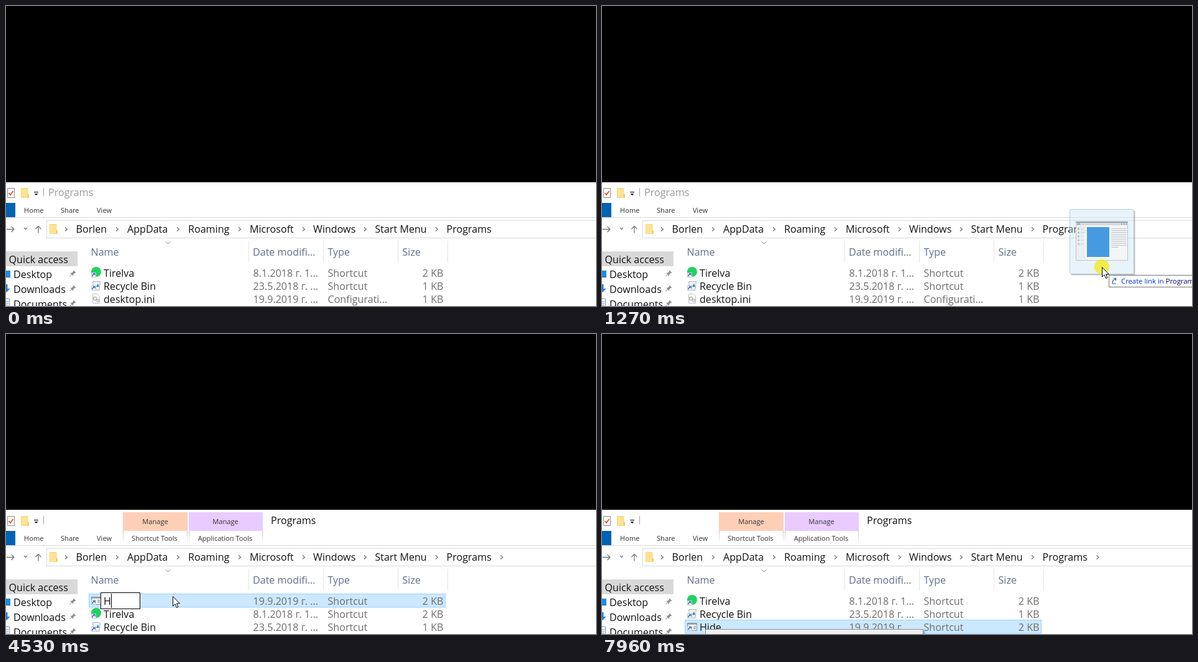
Animation of 949x483 px, one loop 8 s. Source, as an HTML page:

```html
<!DOCTYPE html>
<html lang="en">
<head>
<meta charset="utf-8">
<title>Adding a shortcut to the Start Menu</title>
<style>
html, body { margin: 0; height: 100%; overflow: hidden; background: #000; }
svg { display: block; width: 949px; height: 483px; }
text { font: 16.1px "Open Sans", "Noto Sans", sans-serif; font-variant-ligatures: none; fill: #111; }
.small text, text.small { font-size: 11.1px; fill: #333; }
.mid { text-anchor: middle; }
.end { text-anchor: end; }
.head text { fill: #5f6f8c; }
.cell text { fill: #6d6d6d; }
.line { fill: none; stroke: #777; stroke-width: 1.3; }

/* One loop is 8 s, so 1% is 80 ms. Every change is a hard step. */
.a { animation: 8s step-end -10ms infinite; }
.off { opacity: 0; }

.ptr { animation-name: ptr; }
@keyframes ptr {
  6.25% { opacity: 1; transform: translate(306px, 335px); }
  7.125% { transform: translate(630px, 350px); }
  8% { transform: translate(743px, 357px); }
  9% { transform: translate(769px, 371px); }
  10% { transform: translate(784px, 387px); }
  11% { transform: translate(793px, 399px); }
  12% { transform: translate(798px, 408px); }
  13% { transform: translate(801px, 414px); }
  14% { transform: translate(803px, 418px); }
  15% { transform: translate(804px, 419px); }
  15.875% { transform: translate(804px, 420px); }
  31.25% { transform: translate(780px, 420px); }
  32.25% { transform: translate(690px, 420px); }
  33.25% { transform: translate(565px, 421px); }
  34.25% { transform: translate(430px, 421px); }
  35.25% { transform: translate(330px, 422px); }
  36.25% { transform: translate(284px, 422px); }
  37.25% { transform: translate(268px, 422px); }
  78% { transform: translate(267px, 424px); }
  80.125% { transform: translate(222px, 443px); }
  81% { transform: translate(176px, 461px); }
  82% { transform: translate(166px, 473px); }
  83.875% { opacity: 1; transform: translate(166px, 475px); }
  98.625%, 100% { opacity: 0; transform: translate(166px, 475px); }
}
.press { animation-name: press; }
@keyframes press {
  6.25%, 40.125%, 86.875%, 90.75% { opacity: .7; }
  22.5%, 41%, 88.875%, 92.875% { opacity: 0; }
}
.drag { animation-name: drag; }
@keyframes drag { 6.25% { opacity: 1; } 22.5% { opacity: 0; } }
.hint { animation-name: hint; }
@keyframes hint { 7.125% { opacity: 1; } 22.5% { opacity: 0; } }
.crumb { animation-name: crumb; }
@keyframes crumb { 8% { opacity: 1; } 9% { opacity: 0; } }

.idle { animation-name: idle; }
@keyframes idle { 24.625%, 100% { opacity: 0; } }
.active { animation-name: active; }
@keyframes active { 24.625%, 100% { opacity: 1; } }
.more { animation-name: more; }
@keyframes more { 28.5%, 100% { opacity: 1; } }

.rows { animation-name: rows; }
@keyframes rows { 23.5% { transform: translateY(21px); } 72.25% { transform: none; } }
.fresh { animation-name: fresh; }
@keyframes fresh {
  23.5% { opacity: 1; transform: none; }
  72.25%, 100% { opacity: 1; transform: translateY(42px); }
}
.before { animation-name: before; }
@keyframes before { 46%, 100% { opacity: 0; } }
.after { animation-name: after; }
@keyframes after { 72.25%, 100% { opacity: 1; } }
.hover { animation-name: hover; }
@keyframes hover {
  72.25% { opacity: 1; transform: none; }
  80.125% { opacity: 1; transform: translateY(21px); }
  81% { opacity: 0; }
}

.edit { animation-name: edit; }
@keyframes edit { 46% { opacity: 1; } 72.25% { opacity: 0; } }
.field { animation-name: field; }
@keyframes field {
  46% { width: 266px; }
  56.625% { width: 63px; }
  59.5% { width: 67px; }
  61.625% { width: 77px; }
  62.5%, 100% { width: 86px; }
}
.picked { animation-name: picked; }
@keyframes picked { 56.625%, 100% { opacity: 0; } }
.key { visibility: hidden; }
.k1 { animation-name: k1; }
.k2 { animation-name: k2; }
.k3 { animation-name: k3; }
.k4 { animation-name: k4; }
@keyframes k1 { 56.625%, 100% { visibility: visible; } }
@keyframes k2 { 58.75%, 100% { visibility: visible; } }
@keyframes k3 { 61.625%, 100% { visibility: visible; } }
@keyframes k4 { 62.5%, 100% { visibility: visible; } }
.caret { animation-name: caret; }
@keyframes caret {
  46% { opacity: 1; transform: translateX(372px); }
  52.625% { opacity: 0; }
  56.625% { opacity: 1; transform: translateX(169px); }
  58.75% { transform: translateX(173px); }
  61.625% { transform: translateX(183px); }
  62.5% { transform: translateX(192px); }
  69.375%, 100% { opacity: 0; transform: translateX(192px); }
}
.tip { animation-name: tip; }
@keyframes tip { 93.875% { opacity: .5; } 94.75%, 100% { opacity: 1; } }
</style>
</head>
<body>
<svg viewBox="0 0 949 483">
  <defs>
    <path id="chev" d="M-2 -3 L1.5 0 L-2 3" class="line"/>
    <g id="folder">
      <path d="M0 0H11V10H13V16H0Z" fill="#ffe394"/>
      <path d="M11 10H13V16H10.5Z" fill="#f0c04c"/>
      <path d="M.5 .5H11V10H12.5V15.5H.5Z" fill="none" stroke="#f6d67c"/>
    </g>
    <g id="pin" transform="rotate(45)">
      <path d="M-2.5 -5H2.5V-4L1.7 -3V0L3.6 2H-3.6L-1.7 0V-3L-2.5 -4Z" fill="#8a9097"/>
      <path d="M0 2V6" stroke="#8a9097"/>
    </g>
    <g id="link">
      <path d="M.5 .5H7.5V7.5H.5Z" fill="#fff" stroke="#b8c4d0"/>
      <path d="M2 6.5C2 4 3 3.2 4.5 3.2M3.2 2H6V4.8" fill="none" stroke="#1b5fae" stroke-width="1.3"/>
    </g>
    <linearGradient id="fade" x2="0" y2="1">
      <stop stop-color="#bbb"/><stop offset="1" stop-color="#bbb" stop-opacity="0"/>
    </linearGradient>
  </defs>

  <rect width="949" height="483" fill="#000"/>
  <rect y="283" width="949" height="1" fill="#444"/>
  <rect y="284" width="949" height="199" fill="#fff"/>
  <rect class="a active off" y="283" width="949" height="2" fill="#fff"/>

  <!-- title bar -->
  <path d="M2.5 293.5H13.5V308.5H2.5Z" fill="#fff" stroke="#8b8b8b"/>
  <path d="M4.5 301L7 304L11.5 298" fill="none" stroke="#d9532c" stroke-width="1.8"/>
  <use href="#folder" x="24" y="293"/>
  <path d="M45 299H52V300.2H45ZM45.5 302H51.5L48.5 305Z" fill="#222"/>
  <path d="M60.5 293V306" stroke="#a0a0a0"/>
  <text class="a idle" x="68" y="306" style="fill:#999">Programs</text>

  <g class="a active off small">
    <rect x="188" y="287" width="104" height="30" fill="#fecfb7"/>
    <rect x="294" y="287" width="119" height="30" fill="#e9cbff"/>
    <g fill="url(#fade)">
      <rect x="188" y="317" width="1" height="20"/><rect x="291" y="317" width="1" height="20"/>
      <rect x="294" y="317" width="1" height="20"/><rect x="412" y="317" width="1" height="20"/>
    </g>
    <text class="mid" x="240" y="306">Manage</text>
    <text class="mid" x="353" y="306">Manage</text>
    <text class="mid" x="239" y="333">Shortcut Tools</text>
    <text class="mid" x="352.5" y="333">Application Tools</text>
  </g>
  <text class="a active off" x="426" y="306">Programs</text>

  <!-- ribbon -->
  <rect y="317" width="15" height="23" fill="#0063b1"/>
  <g class="small">
    <text x="29" y="333">Home</text>
    <text x="88" y="333">Share</text>
    <text x="146" y="333">View</text>
  </g>
  <path d="M0 340.5H949" stroke="#dcdcdc"/>

  <!-- address bar -->
  <path d="M1 359.5H13M8.5 355L13 359.5L8.5 364" class="line"/>
  <path d="M29 357L31.5 359.5L34 357" class="line"/>
  <path d="M52 365.5V354.5M47.5 359L52 354.5L56.5 359" class="line"/>
  <path d="M949 345.5H65.5V373.5H949" fill="none" stroke="#d9d9d9"/>
  <g class="a crumb off" fill="#e5f3ff" stroke="#cce8ff">
    <path d="M590.5 346.5H683.5V372.5H590.5ZM683.5 346.5H704.5V372.5H683.5Z"/>
  </g>
  <use href="#folder" x="70" y="351"/>
  <use href="#chev" x="97" y="359.5"/>
  <text x="112.5" y="365">Borlen</text>
  <use href="#chev" x="179" y="359.5"/>
  <text x="195" y="365">AppData</text>
  <use href="#chev" x="277" y="359.5"/>
  <text x="293" y="365">Roaming</text>
  <use href="#chev" x="376" y="359.5"/>
  <text x="392" y="365">Microsoft</text>
  <use href="#chev" x="479" y="359.5"/>
  <text x="494" y="365">Windows</text>
  <use href="#chev" x="578" y="359.5"/>
  <text x="593.5" y="365">Start Menu</text>
  <use href="#chev" x="693" y="359.5"/>
  <text x="708.5" y="365">Programs</text>
  <g class="a more off"><use href="#chev" x="797.5" y="359.5"/></g>

  <!-- sidebar -->
  <rect y="395" width="115" height="24" fill="#d9d9d9"/>
  <text x="4.5" y="414">Quick access</text>
  <rect y="426" width="7" height="11" fill="#1c8fe3"/>
  <path d="M0 436.5H7" stroke="#0b5ea8"/>
  <text x="12" y="438">Desktop</text>
  <path d="M0 448H2.5V455H6.5L1 461L0 460Z" fill="#2b7fd4"/>
  <text x="12" y="462">Downloads</text>
  <path d="M0 471.5H5.5V483M0 475.5H4M0 478.5H4M0 481.5H4" fill="none" stroke="#7d97ae"/>
  <text x="12" y="486">Documents</text>
  <use href="#pin" transform="translate(107 431)"/>
  <use href="#pin" transform="translate(107 455)"/>
  <use href="#pin" transform="translate(107 479)"/>

  <!-- file list -->
  <path d="M257 379.5L260.5 383L264 379.5" class="line" style="stroke-width:1"/>
  <path d="M390.5 378V413M510.5 378V413M630.5 378V413M710.5 378V413" stroke="#e5e5e5"/>
  <g class="head">
    <text x="136.5" y="402">Name</text>
    <text x="397" y="402">Date modifi...</text>
    <text x="517.5" y="402">Type</text>
    <text x="637.5" y="402">Size</text>
  </g>

  <rect class="a hover off" x="133" y="419" width="574" height="21" fill="#e5f3ff"/>
  <g class="a rows">
    <circle cx="145" cy="428" r="8" fill="#1ed35f"/>
    <use href="#link" x="137" y="429"/>
    <text x="157" y="436">Tirelva</text>
    <g class="cell">
      <text x="397.5" y="436">8.1.2018 г. 1...</text>
      <text x="517.5" y="436">Shortcut</text>
      <text class="end" x="703.5" y="436">2 KB</text>
    </g>

    <path d="M139.5 443.5H151.5L150 457.5H141Z" fill="#eef2f5" stroke="#a9b4bd"/>
    <path d="M145 452L148 447L150 452Z" fill="#2f86d6"/>
    <use href="#link" x="137" y="450"/>
    <text x="157" y="457">Recycle Bin</text>
    <g class="cell">
      <text x="397.5" y="457">23.5.2018 г. ...</text>
      <text x="517.5" y="457">Shortcut</text>
      <text class="end" x="703.5" y="457">1 KB</text>
    </g>

    <path d="M139.5 463.5H147L150.5 467V478.5H139.5Z" fill="#fafafa" stroke="#c4c4c4"/>
    <circle cx="143" cy="471" r="2.5" fill="none" stroke="#b4b9be" stroke-width="1.5"/>
    <circle cx="147.5" cy="474" r="2" fill="none" stroke="#b4b9be" stroke-width="1.3"/>
    <text x="157" y="478">desktop.ini</text>
    <g class="cell">
      <text x="397.5" y="478">19.9.2019 г. ...</text>
      <text x="517.5" y="478">Configurati...</text>
      <text class="end" x="703.5" y="478">1 KB</text>
    </g>
  </g>

  <g class="a fresh off">
    <rect x="133.5" y="418.5" width="573" height="21.5" fill="#cce8ff" stroke="#99d1ff"/>
    <path d="M137.5 423.5H152.5V435.5H137.5Z" fill="#fff" stroke="#85909a"/>
    <path d="M138 425H152" stroke="#9aa6b0" stroke-width="2"/>
    <path d="M147 428.5H151M147 430.5H151M147 432.5H151" stroke="#7c8fa2"/>
    <use href="#link" x="137" y="428"/>
    <text class="a before" x="157" y="436">WindowHider.exe - Shortcut</text>
    <text class="a after off" x="157" y="436">Hide</text>
    <g class="cell">
      <text x="397.5" y="436">19.9.2019 г. ...</text>
      <text x="517.5" y="436">Shortcut</text>
      <text class="end" x="703.5" y="436">2 KB</text>
    </g>
  </g>

  <g class="a edit off">
    <rect class="a field" x="152.5" y="416.5" width="63" height="26" fill="#fff" stroke="#000"/>
    <g class="a picked">
      <rect x="157" y="418" width="215" height="23" fill="#0078d7"/>
      <text x="157" y="436" style="fill:#fff">WindowHider.exe - Shortcut</text>
    </g>
    <text x="157" y="436"><tspan class="a key k1">H</tspan><tspan class="a key k2">i</tspan><tspan class="a key k3">d</tspan><tspan class="a key k4">e</tspan></text>
    <rect class="a caret off" y="418" width="1" height="23" fill="#000"/>
  </g>

  <g class="a tip off">
    <rect x="169" y="478" width="351" height="20" fill="#000" opacity=".2"/>
    <rect x="166.5" y="475.5" width="350" height="20" fill="#f0f0f0" stroke="#8c8c8c"/>
  </g>

  <!-- pointer with its dragged item -->
  <g class="a ptr off">
    <g class="a drag off">
      <path d="M52.5 -90V12.5H-49" fill="none" stroke="#000" stroke-opacity=".22" stroke-width="2"/>
      <rect x="-51.5" y="-92.5" width="103" height="104" rx="3" fill="#c6e2f3" fill-opacity=".4" stroke="#7aa5bd" stroke-opacity=".5"/>
      <g transform="translate(-42 -73)" opacity=".9">
        <rect x=".5" y=".5" width="83" height="62" fill="#f5f6f7" stroke="#b9c0c6"/>
        <rect width="84" height="6" fill="#d3d8dc"/>
        <path d="M0 1H84" stroke="#8b949b" stroke-width="2"/>
        <path d="M2 4H7M73 4H75M77 4H79M81 4H83" stroke="#7d878f" stroke-width="1.5"/>
        <path d="M1 7H15V62H1Z" fill="#eceff1"/>
        <path d="M3 12H6M3 18H6M3 24H6M3 30H6M3 36H6" stroke="#b3bac0" stroke-width="2.5"/>
        <path d="M8 12H13M8 18H13M8 24H13M8 30H13M8 36H13" stroke="#c8ced3"/>
        <rect x="18" y="9" width="36" height="48" fill="#3592de"/>
        <path d="M57 11.5H82M57 14.5H82M57 17.5H82M57 20.5H82M57 23.5H81M57 26.5H82M57 29.5H82M57 32.5H81M57 35.5H82M57 38.5H82M57 41.5H69" stroke="#bcc2c8"/>
      </g>
    </g>
    <circle class="a press off" r="12" fill="#f4e800"/>
    <g class="a hint off">
      <rect x="11.5" y="13.5" width="149" height="19" fill="#fff" stroke="#767676"/>
      <path d="M22.5 27H17.5C16 23 18.5 20 22 20M19 18.5H22.5V22" fill="none" stroke="#1c4f9c" stroke-width="1.2"/>
      <text class="small" x="31" y="27" style="font-size:11.3px;fill:#0033c8">Create link in <tspan fill="#00006b">Programs</tspan></text>
    </g>
    <path d="M.5 .7V16L4 12.7L6.5 18.5L9 17.4L6.5 11.8H11.3Z" fill="#fff" stroke="#000"/>
  </g>
</svg>
</body>
</html>
```
